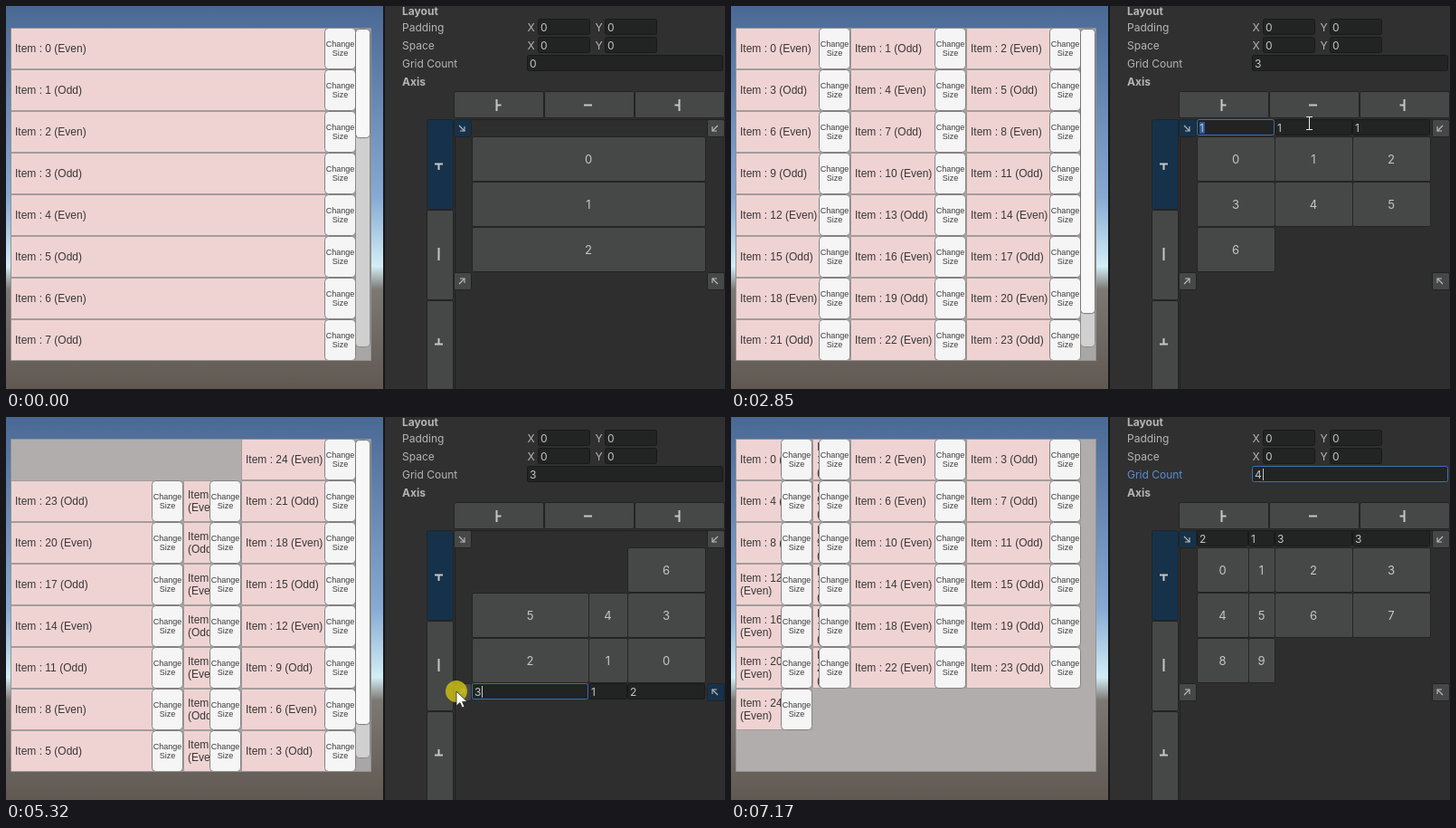
These frames come from a looping animation (795x423 px, 7320 ms). An HTML page with a canvas:

```html
<!DOCTYPE html>
<html>
<head>
<meta charset="utf-8">
<style>
html, body { margin: 0; width: 100%; height: 100%; overflow: hidden; background: #303030; }
canvas { display: block; }
</style>
</head>
<body>
<canvas id="stage" width="795" height="423"></canvas>
<script>
const c = document.getElementById('stage').getContext('2d');
const LOOP = 7320, STEP = LOOP / 95;
const SANS = '"Liberation Sans", Arial, sans-serif', UI = 'Inter, sans-serif';
const GRAY = '#b5b5b5', LIGHT = '#c6c6c6';

// Interface changes by step. Corner bits: 1 = right, 2 = bottom.
const events = [
  [0, { cols: [1], grid: '0', corner: 0 }],
  [18, { focus: 'grid' }],
  [22, { cols: [1, 1, 1], grid: '3' }],
  [34, { focus: 0, select: true }],
  [38, { cols: [2, 1, 1], select: false }],
  [44, { focus: 2, select: true }],
  [48, { cols: [2, 1, 3], select: false }],
  [58, { corner: 1 }],
  [64, { corner: 3 }],
  [70, { corner: 2 }],
  [79, { corner: 0 }],
  [84, { focus: 'grid', select: true }],
  [89, { cols: [2, 1, 3, 3], grid: '4', select: false }]
];

// Pointer stops: arrival step, leaving step, x, y
const stops = [
  [12, 12, 414, 330], [15, 15, 530, 12], [18, 24, 595, 64], [32, 35, 565, 129],
  [39, 49, 713, 129], [56, 58, 785, 137], [62, 64, 785, 303], [69, 70, 498, 303],
  [78, 79, 505, 127], [82, 89, 595, 64]
];

const stateAt = k => Object.assign({}, ...events.filter(e => e[0] <= k).map(e => e[1]));

// A field takes focus on the click, a corner switches one step after it
const clicked = k => events.some(([at, e]) =>
  'focus' in e && at === k || at && 'corner' in e && at === k + 1);

function rect(x, y, w, h, fill, line, r = 0) {
  const inset = line ? .5 : 0;
  c.beginPath();
  c.roundRect(x + inset, y + inset, w - 2 * inset, h - 2 * inset, r);
  c.fillStyle = fill;
  c.fill();
  if (line) {
    c.strokeStyle = line;
    c.lineWidth = 1;
    c.stroke();
  }
}

function text(s, x, y, font, fill, align = 'left') {
  c.font = font;
  c.fillStyle = fill;
  c.textAlign = align;
  c.fillText(s, x, y);
}

function line(color, width, ...points) {
  c.strokeStyle = color;
  c.lineWidth = width;
  c.beginPath();
  points.forEach(([x, y]) => c.lineTo(x, y));
  c.stroke();
}

// Column boxes for the given weights, mirrored when laid out from the right
function spans(cols, x, width, flip) {
  const total = cols.reduce((a, b) => a + b);
  let sum = 0;
  return cols.map(n => {
    const a = sum / total, b = (sum += n) / total;
    const from = Math.round(x + width * (flip ? 1 - b : a));
    return { x: from, w: Math.round(x + width * (flip ? 1 - a : b)) - from };
  });
}

function wrap(s, width) {
  const out = [''];
  for (const word of s.split(' ')) {
    const last = out[out.length - 1], next = last ? last + ' ' + word : word;
    if (last && c.measureText(next).width > width) out.push(word);
    else out[out.length - 1] = next;
  }
  return out;
}

function sky() {
  const g = c.createLinearGradient(0, 0, 0, 423);
  g.addColorStop(0, '#4a6894');
  g.addColorStop(.5, '#86aad4');
  g.addColorStop(.68, '#d2eef6');
  g.addColorStop(.74, '#7c7873');
  g.addColorStop(1, '#605952');
  rect(0, 0, 417, 423, g);
}

function list({ cols, corner }) {
  const n = cols.length, rows = Math.ceil(25 / n);
  const cells = spans(cols, 4.5, 382.5, corner & 1);
  rect(5, 24, 399, 368, '#b1adac', '#959190');
  c.save();
  c.beginPath();
  c.rect(6, 25, 397, 366);
  c.clip();
  for (let i = 0; i < 25; i++) {
    const row = Math.floor(i / n), { x, w } = cells[i % n];
    const y = 24 + 46 * (corner & 2 ? rows - 1 - row : row);
    rect(x, y, w, 46, '#efd3d3', '#a39c9c');
    c.font = '12px ' + SANS;
    const label = wrap(`Item : ${i} (${i % 2 ? 'Odd' : 'Even'})`, w - 5);
    label.forEach((s, j) =>
      text(s, x + 5, y + 27 + 14 * (j - (label.length - 1) / 2), '12px ' + SANS, '#3a3636'));
    rect(x + w - 35, y, 35, 46, '#f5f5f5', '#858181', 4);
    ['Change', 'Size'].forEach((s, j) =>
      text(s, x + w - 17.5, y + 21 + 10 * j, '9px ' + SANS, '#3c3c3c', 'center'));
  }
  const share = 8 / rows;
  if (share < 1) {
    rect(387, 25, 16, 366, '#a9a7a6');
    rect(386, 25, 17, 352, '#d0d0d0', '#8a8a8a', 4);
    rect(386, 25, 17, 12 + 341 * share, '#f8f8f8', '#777', 4);
  }
  c.restore();
}

function field(x, y, w, value, focused, select) {
  rect(x, y, w, 18, '#222323', focused ? '#3a72b0' : '#191919', 2);
  c.font = '12px ' + UI;
  const width = c.measureText(value).width;
  if (focused && select) rect(x + 3, y + 3, width + 1, 13, '#2c5d9b');
  text(value, x + 3, y + 14, '12px ' + UI, LIGHT);
  if (focused && !select) rect(Math.round(x + 4 + width), y + 3, 1, 13, LIGHT);
}

function button(x, y, w, h, on) {
  rect(x, y, w, h, on ? '#16324a' : '#464847', '#232323', 2);
}

// Alignment mark: a stem, with a bar at its start (-1) or end (1)
function alignIcon(x, y, side, angle, offset, half, stem) {
  c.save();
  c.translate(x, y);
  c.rotate(angle);
  if (side) {
    line(LIGHT, 2, [side * offset, -half], [side * offset, half]);
    line(LIGHT, 2, [side * offset, 0], [side * -4, 0]);
  } else line(LIGHT, 2, [-stem, 0], [stem, 0]);
  c.restore();
}

function arrow(x, y, dx, dy) {
  c.save();
  c.translate(x, y);
  c.scale(dx, dy);
  line('#bdbdbd', 1.1, [-3, -3], [3, 3]);
  line('#bdbdbd', 1.1, [3, -2], [3, 3], [-2, 3]);
  c.restore();
}

function panel({ cols, grid, focus, select }, corner) {
  const bold = 'bold 12px ' + UI, plain = '12px ' + UI, gridOn = focus === 'grid';
  rect(417, 0, 2, 423, '#171717');
  rect(419, 0, 376, 423, '#303030');
  text('Layout', 438, 10, bold, GRAY);
  text('Axis', 438, 88, bold, GRAY);
  ['Padding', 'Space'].forEach((name, i) => {
    const y = 14 + 20 * i;
    text(name, 438, y + 14, plain, GRAY);
    text('X', 576.5, y + 14, plain, GRAY);
    text('Y', 651.5, y + 14, plain, GRAY);
    field(588, y, 58, '0');
    field(662, y, 58, '0');
  });
  text('Grid Count', 438, 68, plain, gridOn ? '#5a8dd2' : GRAY);
  field(576, 54, 217, grid, gridOn, select);

  for (let i = 0; i < 3; i++) {
    button(495 + 100 * i, 94, 100, 30);
    button(465, 125 + 100 * i, 30, 100, i === 0);
    alignIcon(543.5 + 100 * i, 109.5, i - 1, 0, 1, 6.5, 4.5);
    alignIcon(478.5, 177 + 97 * i, i - 1, Math.PI / 2, 2.5, 4.5, 7);
  }

  rect(496, 125, 300, 300, '#2e2e2e', '#202020');
  const n = cols.length, bottom = corner & 2, cells = spans(cols, 516, 258, corner & 1);
  for (let i = 0; i < Math.max(3, 3 * n - 2); i++) {
    const row = Math.floor(i / n), { x, w } = cells[i % n];
    const y = bottom ? 244 - 50 * row : 144 + 50 * row;
    button(x - 1, y, w + 1, 50);
    text(i, x + w / 2 - 1, y + 30, '13px ' + UI, LIGHT, 'center');
  }
  if (n > 1) cells.forEach(({ x, w }, i) =>
    field(x - 1, bottom ? 294 : 125, w, String(cols[i]), i === focus, select));
  for (let i = 0; i < 4; i++) {
    const right = i & 1, low = i & 2, x = right ? 775 : 495, y = low ? 294 : 125;
    button(x, y, 20, 20, i === corner);
    arrow(x + 9, y + 10, right ? -1 : 1, low ? -1 : 1);
  }
}

function pointerAt(k) {
  const i = stops.findLastIndex(s => s[0] <= k);
  const [, leave, x, y] = stops[i], [arrive, , x1, y1] = stops[i + 1] || stops[i];
  const u = k > leave ? (k - leave) / (arrive - leave) : 0, e = u * u * (3 - 2 * u);
  return [Math.round(x + (x1 - x) * e), Math.round(y + (y1 - y) * e)];
}

function pointer(k, { cols, corner, focus }) {
  const typing = k >= 22 && k < 24;
  if (k < 12 || k > 88 || typing) return;
  const [x, y] = pointerAt(k);
  if (clicked(k)) {
    c.beginPath();
    c.arc(x, y, 12, 0, 7);
    c.fillStyle = 'rgba(200,188,20,.85)';
    c.fill();
  }
  c.save();
  c.translate(x, y);
  const overGrid = k > 18 && focus === 'grid' && x > 576 && y > 54 && y < 72;
  const overCols = cols.length > 1 && !(corner & 2) && x > 516 && x < 774 && y > 125 && y < 143;
  if (overGrid || overCols) {
    line('#e8e8e8', 1, [.5, -6], [.5, 7]);
    for (const end of [-6.5, 7.5]) line('#e8e8e8', 1, [-3, end], [4, end]);
  } else {
    const shape = new Path2D('M0 0V16L4 12.5 6.5 18 9 17 6.6 11.5H12Z');
    c.fillStyle = '#fff';
    c.fill(shape);
    c.strokeStyle = '#222';
    c.lineWidth = .8;
    c.stroke(shape);
  }
  c.restore();
}

function draw(now) {
  const k = Math.floor((now % LOOP + 3) / STEP), state = stateAt(k);
  sky();
  list(state);
  // The inspector repaints its corner one step after the list
  panel(state, stateAt(Math.max(0, k - 1)).corner);
  pointer(k, state);
}

let start;
function tick(now) {
  start ??= now;
  draw(now - start);
  requestAnimationFrame(tick);
}
requestAnimationFrame(tick);
</script>
</body>
</html>
```
